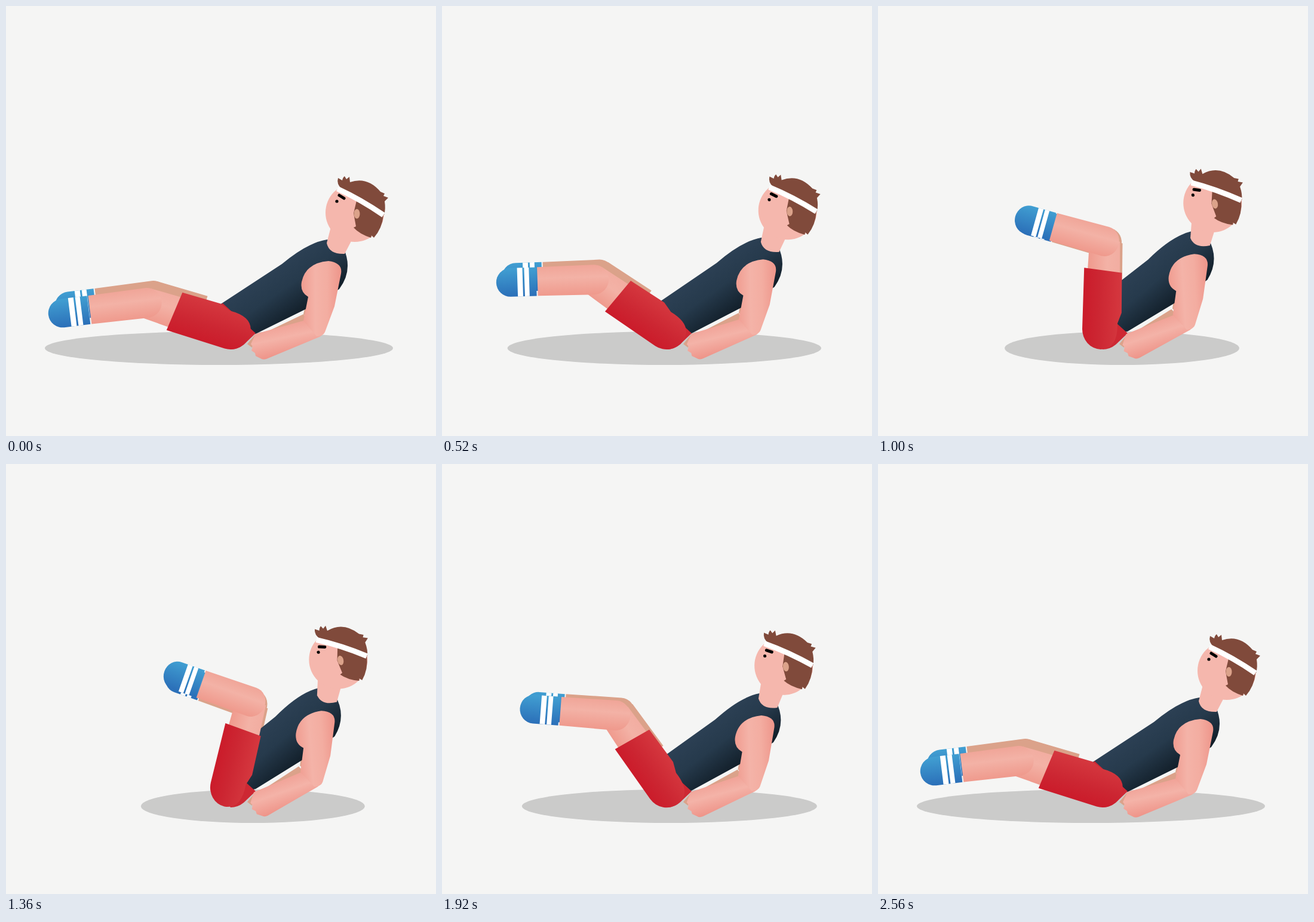
Recreate the animation shown at these times as an HTML page without scripts. Size 720 by 720 pixels, loop 2600 ms.

```html
<!DOCTYPE html>
<html lang="en">
<head>
<meta charset="utf-8">
<title>Knee tuck exercise</title>
<style>
  /* --tuck: 0 = legs stretched, 1 = knees in; --shrink: shadow inset in px */
  @property --tuck { syntax: '<number>'; inherits: true; initial-value: 0; }
  @property --shrink { syntax: '<number>'; inherits: true; initial-value: 0; }

  html, body { margin: 0; width: 100%; height: 100%; overflow: hidden; background: #f5f5f4; }
  svg { display: block; width: 100%; height: 100%; animation: tuck 2600ms infinite; }

  @keyframes tuck {
    0%     { --tuck: 0;    --shrink: 0;   animation-timing-function: cubic-bezier(.33, 0, .8, .5); }
    12.31% { --tuck: .047; --shrink: 14;  animation-timing-function: cubic-bezier(.4, .1, .75, .52); }
    26.15% { --tuck: .455; --shrink: 99;  animation-timing-function: cubic-bezier(.33, .45, .67, .8); }
    38.46% { --tuck: .853; --shrink: 147; animation-timing-function: cubic-bezier(.33, .5, .67, 1); }
    50%    { --tuck: 1;    --shrink: 162; animation-timing-function: cubic-bezier(.33, 0, .67, .33); }
    63.08% { --tuck: .78;  --shrink: 126; animation-timing-function: linear; }
    73.85% { --tuck: .43;  --shrink: 69;  animation-timing-function: cubic-bezier(.33, .37, .67, .87); }
    87.7%  { --tuck: .03;  --shrink: 7;   animation-timing-function: cubic-bezier(.2, .5, .67, 1); }
    98.5%, 100% { --tuck: 0; --shrink: 0; }
  }

  .shadow {
    fill: #cbcbca;
    cx: calc(356.5px + var(--shrink) * .3535px);
    rx: calc(291.5px - var(--shrink) * .6465px);
  }
  .torso { transform-origin: 365px 545px; transform: rotate(calc(var(--tuck) * -5.5deg)); }
  .head {
    transform-origin: 556px 405px;
    transform: translate(calc(var(--tuck) * -15px), calc(var(--tuck) * -14px))
               rotate(calc(var(--tuck) * -12deg));
  }
  .brow { transform-origin: 562px 320px; transform: rotate(calc(var(--tuck) * -18deg)); }
  .forearm { transform-origin: 420px 572px; transform: rotate(calc(var(--tuck) * -7.5deg)); }
  .upper-arm {
    transform-origin: 515px 539px;
    transform: translate(calc(var(--tuck) * -4.3px), calc(var(--tuck) * -12.3px))
               rotate(calc(var(--tuck) * -4deg));
  }
  .far-leg {
    transform: translate(calc(11px - var(--tuck) * 8px), calc(var(--tuck) * 17px - 12px));
  }
  .thigh { transform: translate(376px, 541px) rotate(calc(var(--tuck) * 87deg - 73deg)); }
  .shin {
    transform: translate(1px, -147px) rotate(calc(66deg - var(--tuck) * 60.5deg))
               scaleX(calc(1 - var(--tuck) * .07));
  }
  .shorts { transform-origin: -34px 0; transform: scaleX(calc(1 - var(--tuck) * .08)); }
  .far { fill: #dba28a; }
  .hair { fill: #804a3b; }
  .face { fill: #f5b7ad; }
</style>
</head>
<body>
<svg viewBox="0 0 720 720" xmlns="http://www.w3.org/2000/svg">
  <defs>
    <linearGradient id="shinSkin" x2="0" y2="1">
      <stop stop-color="#f0a598"/><stop offset=".4" stop-color="#f3b2a6"/><stop offset="1" stop-color="#ef998c"/>
    </linearGradient>
    <linearGradient id="thighSkin">
      <stop stop-color="#ef998c"/><stop offset=".6" stop-color="#f3b2a6"/><stop offset="1" stop-color="#f2ada1"/>
    </linearGradient>
    <linearGradient id="armSkin">
      <stop stop-color="#f09c90"/><stop offset=".35" stop-color="#f4b3a8"/>
      <stop offset=".65" stop-color="#f3ada1"/><stop offset="1" stop-color="#ee958a"/>
    </linearGradient>
    <linearGradient id="forearmSkin" x1=".35" y1=".2" x2=".6" y2=".85">
      <stop stop-color="#f1a398"/><stop offset=".4" stop-color="#f4b3a8"/><stop offset="1" stop-color="#ee9388"/>
    </linearGradient>
    <linearGradient id="sock" x2="0" y2="1">
      <stop stop-color="#419fd2"/><stop offset="1" stop-color="#2b6fb8"/>
    </linearGradient>
    <linearGradient id="shorts">
      <stop stop-color="#cb1b2a"/><stop offset=".4" stop-color="#cc2632"/><stop offset="1" stop-color="#d5383f"/>
    </linearGradient>
    <linearGradient id="shirt" gradientUnits="userSpaceOnUse" x1="440" y1="445" x2="488" y2="515">
      <stop stop-color="#2c4054"/><stop offset=".45" stop-color="#263a4c"/><stop offset="1" stop-color="#13202b"/>
    </linearGradient>
  </defs>

  <ellipse class="shadow" cy="573" ry="28"/>

  <g class="far">
    <path class="forearm" d="M425 551L498 516L512 535L430 560Z"/>
    <path class="upper-arm" d="M508 470L498 516L515 535L530 480Z"/>
  </g>

  <g class="far-leg">
    <g class="thigh">
      <path class="far" d="M-26 -147L-27 -60H27L26 -147Z"/>
      <g class="shin">
        <path class="far" d="M-96 -24L0 -25A25 25 0 0 1 0 25L-96 24Z"/>
        <path fill="url(#sock)" d="M-98 -24H-142A24 24 0 0 0 -142 24H-98Z"/>
        <path fill="#fff" d="M-110 -24h-8v48h8zM-121 -24h-9v48h9z"/>
      </g>
    </g>
  </g>

  <path class="torso" fill="url(#shirt)"
        d="M355 502L462 432Q505 396 538 391L565 405Q582 442 558 474L503 507L418 549L380 555Z"/>
  <path fill="#cd2833" d="M362 497L418 548L398 567Q388 575 376 575L350 540Z"/>

  <g class="thigh">
    <path fill="url(#thighSkin)" d="M-25 -147L-28 -80H27L26 -147Z"/>
    <g class="shin">
      <path fill="url(#shinSkin)" d="M-96 -24L0 -25A25 25 0 0 1 0 25L-96 24Z"/>
      <path fill="url(#sock)" d="M-98 -24H-142A24 24 0 0 0 -142 24H-98Z"/>
      <path fill="#fff" d="M-110 -24h-8v48h8zM-121 -24h-9v48h9z"/>
    </g>
    <path class="shorts" fill="url(#shorts)" d="M-33 -102L35 -95L36 -28L29 -10Q31 33 0 34A34 34 0 0 1 -34 0Z"/>
  </g>

  <g class="head">
    <path class="face" d="M544 370L537 397Q541 416 567 415L580 390Z"/>
    <circle class="face" cx="584" cy="346" r="49"/>
    <path class="hair" d="M562 306Q553 298 556 288L563 292Q564 287 567 285L570 290L575 286L576 295
                          Q605 285 627 311L634 314L632 318L640 321L634 327Q636 340 633 350L592 324Z"/>
    <path class="hair" d="M587 326L632 350Q630 372 616 388L612 384L611 388Q592 382 582 371L586 369L582 347Z"/>
    <ellipse cx="587.500" cy="348" rx="5" ry="8" fill="#dba28a"/>
    <path d="M555 306Q594 324 632 350" fill="none" stroke="#fff" stroke-width="9"/>
    <circle cx="554" cy="327" r="2.600"/>
    <path class="brow" d="M558 317L566 322" stroke="#000" stroke-width="5" stroke-linecap="round"/>
  </g>

  <path class="far" d="M418 549L404 566L412 572Z"/>
  <path class="forearm" fill="url(#forearmSkin)"
        d="M418 549L498 527L520 524L533 545Q531 551 525 554L436 591Q430 593 426 590L418 586L417 581L411 577L413 570L410 566Z"/>
  <path class="upper-arm" fill="url(#armSkin)"
        d="M506 487Q492 479 495 462Q502 430 540 427Q564 430 561 448L550 503L534 546Q531 553 520 553L498 527Z"/>
</svg>
</body>
</html>
```
